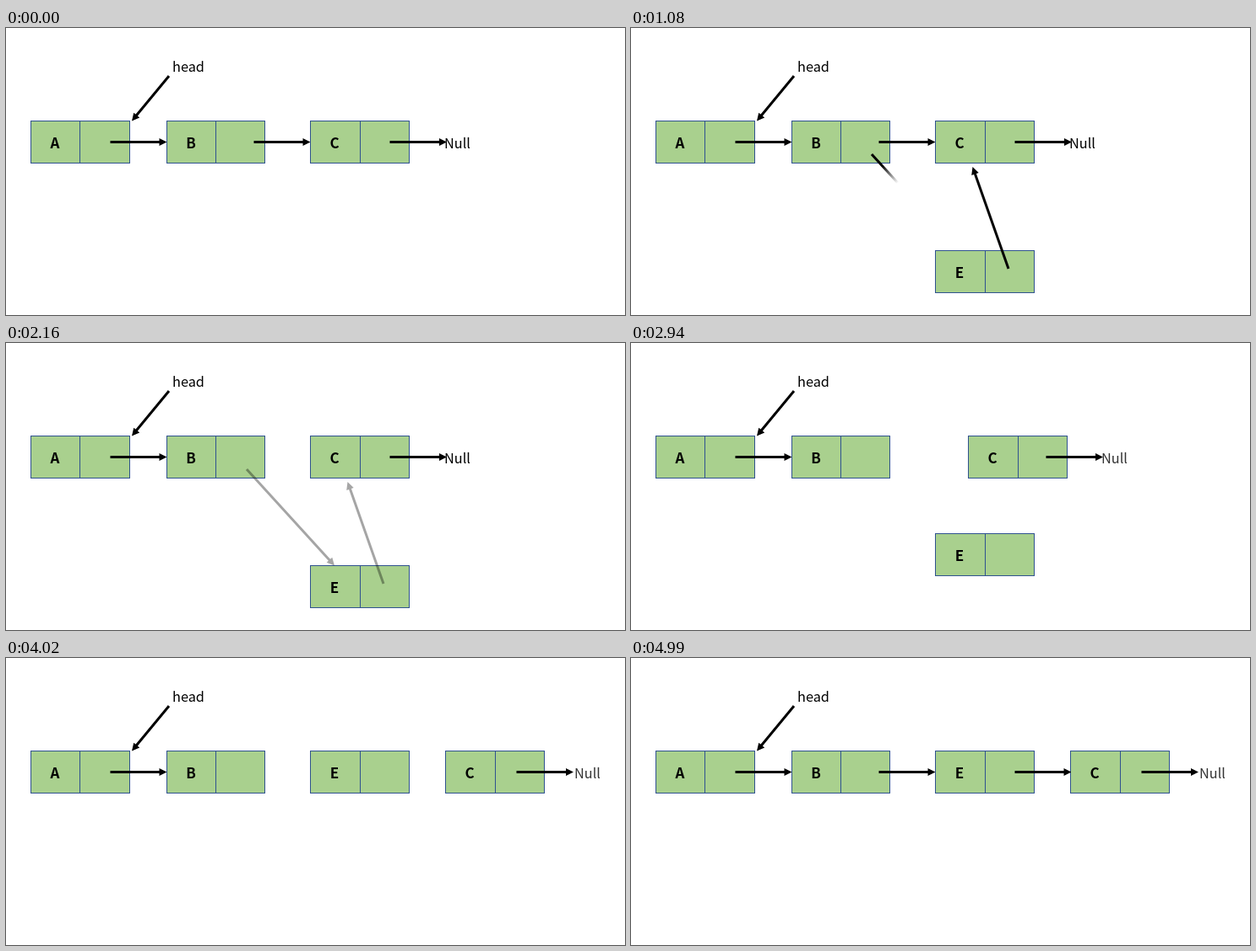
An HTML page for the animation above (5050 ms loop, 733 by 341 pixels).

```html
<!DOCTYPE html>
<html lang="en">
<head>
<meta charset="utf-8">
<title>Linked list insertion</title>
<style>
  html, body { margin: 0; width: 100%; height: 100%; overflow: hidden; background: #fff; }
  svg { display: block; width: 733px; height: 341px; }
  text { font-family: "Noto Sans CJK SC", "Noto Sans", sans-serif; font-size: 16.3px; }
  .letter { font-size: 17px; font-weight: 700; text-anchor: middle; }
  .box { fill: #a9d08e; stroke: #2f528f; }
</style>
</head>
<body>
<svg id="stage" viewBox="0 0 733 341"></svg>
<script>
const LOOP = 5050;
const STEP = 60;
const SOFT = 0.18; // width of a wipe's soft edge, as a share of the arrow
const stage = document.getElementById("stage");

function add(parent, tag, attrs, content = "") {
  const node = document.createElementNS("http://www.w3.org/2000/svg", tag);
  for (const key in attrs) node.setAttribute(key, attrs[key]);
  node.textContent = content;
  return parent.appendChild(node);
}

function addNode(letter, x, y, width, divider) {
  const group = add(stage, "g", {});
  add(group, "rect", { class: "box", x: 0.5, y: 0.5, width, height: 50 });
  add(group, "path", { d: `M${divider + 0.5} 0.5v50`, stroke: "#2f528f" });
  add(group, "text", { class: "letter", x: 29, y: 33 }, letter);
  place(group, x, y);
  return group;
}

// Shaft and head form one outline, filled by a gradient along its length.
function addArrow(x1, y1, x2, y2) {
  const length = Math.hypot(x2 - x1, y2 - y1);
  const angle = Math.atan2(y2 - y1, x2 - x1) * 180 / Math.PI;
  const neck = length - 9;
  const id = "wipe" + stage.childElementCount;
  const group = add(stage, "g", {});
  const gradient = add(group, "linearGradient",
    { id, gradientUnits: "userSpaceOnUse", x1: 0, y1: 0, x2: length, y2: 0 });
  const solid = add(gradient, "stop", { offset: 1 });
  const clear = add(gradient, "stop", { offset: 1, "stop-opacity": 0 });
  add(group, "path", {
    d: `M0-1.5H${neck}V-4.5L${length} 0L${neck} 4.5V1.5H0Z`,
    transform: `translate(${x1} ${y1}) rotate(${angle})`,
    fill: `url(#${id})`
  });
  return {
    group,
    wipe(p) {
      const edge = p * (1 + SOFT);
      solid.setAttribute("offset", clamp(edge - SOFT));
      clear.setAttribute("offset", clamp(edge));
      group.setAttribute("visibility", p > 0 ? "visible" : "hidden");
    }
  };
}

const clamp = v => Math.min(1, Math.max(0, v));
const progress = (t, start, duration = 403) => clamp((t - start) / duration);
const ease = p => p < 0.5 ? 2 * p * p : 1 - 2 * (1 - p) ** 2;
const place = (node, x, y) => node.setAttribute("transform", `translate(${x} ${y})`);
const fade = (node, alpha) => node.setAttribute("opacity", alpha);

addNode("A", 29, 110, 117, 58);
addNode("B", 190, 110, 116, 58);
const nodeC = addNode("C", 360, 110, 117, 59);
const nodeE = addNode("E", 360, 264, 117, 59);
add(stage, "text", { x: 197, y: 52 }, "head");
const nullText = add(stage, "text", { x: 519, y: 143 }, "Null");

addArrow(193, 57, 149, 110.5);
addArrow(123.5, 135.5, 190.5, 135.5);
const arrowBC = addArrow(293.5, 135.5, 360.5, 135.5);
const arrowNull = addArrow(454.5, 135.5, 522, 135.5);
const arrowUp = addArrow(447, 286, 404.5, 165);
const arrowDown = addArrow(285, 150, 389, 264.5);
const arrowEC = addArrow(454.5, 135.5, 521.5, 135.5);

function draw(t) {
  fade(nodeE, progress(t, 40));
  arrowUp.wipe(progress(t, 518));
  arrowDown.wipe(progress(t, 978));

  const links = 1 - progress(t, 1898);
  fade(arrowUp.group, links);
  fade(arrowDown.group, links);

  const move = ease(progress(t, 2377, 1613));
  place(nodeC, Math.round(360 + 160 * move), 110);
  place(nodeE, 360, Math.round(264 - 154 * move));
  place(arrowNull.group, Math.round(150 * move), 0);
  place(nullText, Math.round(154 * move), 0);
  nullText.setAttribute("fill", move > 0 ? "#333" : "#000");

  // The link out of B fades away, then is wiped in again.
  const relinking = t > 4000;
  fade(arrowBC.group, relinking ? 1 : 1 - progress(t, 1438));
  arrowBC.wipe(relinking ? progress(t, 4090) : 1);
  arrowEC.wipe(progress(t, 4550));
}

function tick() {
  const t = performance.now() % LOOP;
  const shift = t >= 4090 ? 10 : 0;
  draw(Math.floor((t - shift) / STEP) * STEP + shift);
  requestAnimationFrame(tick);
}

draw(0);
requestAnimationFrame(tick);
</script>
</body>
</html>
```
